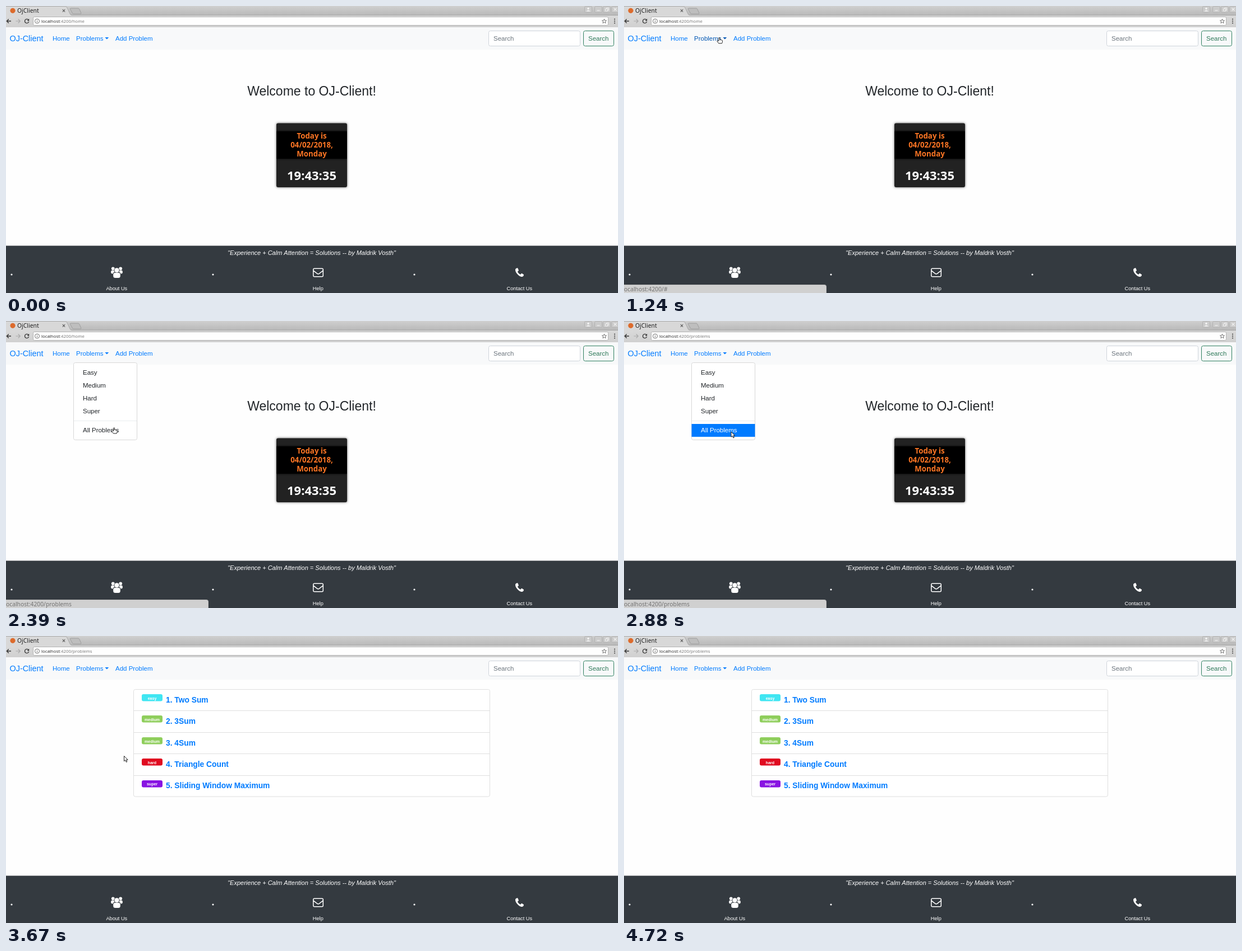
Animation, 1091 px wide and 513 px high, one loop 5290 ms. Source, as an HTML page with a canvas:

```html
<!DOCTYPE html>
<html lang="en">
<head>
<meta charset="utf-8">
<title>OjClient</title>
<style>
html, body { margin: 0; width: 100%; height: 100%; overflow: hidden; background: #fefefe; }
canvas { display: block; width: 1091px; height: 513px; }
</style>
</head>
<body>
<canvas id="stage" width="1091" height="513"></canvas>
<script>
const ctx = document.getElementById('stage').getContext('2d');
const LOOP = 5290;
const SANS = '"Liberation Sans", Arial, sans-serif';
const UI = '"Noto Sans", "Open Sans", sans-serif';
const BLUE = '#007bff', FOOTER = '#343a40';

function text(str, x, y, size, color, { family = SANS, style = '', align = 'left' } = {}) {
  ctx.font = `${style} ${size}px ${family}`;
  ctx.textAlign = align;
  ctx.fillStyle = color;
  ctx.fillText(str, x, y);
}

function rect(x, y, w, h, color) {
  ctx.fillStyle = color;
  ctx.fillRect(x, y, w, h);
}

function box(x, y, w, h, radius, fill, stroke) {
  ctx.beginPath();
  ctx.roundRect(x, y, w, h, radius);
  if (fill) { ctx.fillStyle = fill; ctx.fill(); }
  if (stroke) { ctx.strokeStyle = stroke; ctx.lineWidth = 1; ctx.stroke(); }
}

function shape(d, x, y, fill, stroke, width = 1) {
  const path = new Path2D(d);
  ctx.save();
  ctx.translate(x, y);
  ctx.lineJoin = 'round';
  if (fill) { ctx.fillStyle = fill; ctx.fill(path); }
  if (stroke) { ctx.strokeStyle = stroke; ctx.lineWidth = width; ctx.stroke(path); }
  ctx.restore();
}

function dot(x, y, r, color) {
  ctx.beginPath();
  ctx.arc(x, y, r, 0, Math.PI * 2);
  ctx.fillStyle = color;
  ctx.fill();
}

function vertical(y0, y1, top, bottom) {
  const g = ctx.createLinearGradient(0, y0, 0, y1);
  g.addColorStop(0, top);
  g.addColorStop(1, bottom);
  return g;
}

function drawBrowser(path) {
  rect(0, 0, 1091, 17, vertical(0, 17, '#cfcfcf', '#b8b8b8'));
  rect(0, 17, 1091, 21, vertical(17, 38, '#d9d9d9', '#d0d0d0'));
  shape('M0 17V1H106Q108 1 109 3L114 14Q115 17 118 17Z', 0, 0, '#d8d8d8');
  shape('M0 .5H106Q108 1 109 3L114 14Q115 16.5 118 16.5H1091', 0, 0, null, '#a0a0a0', .8);
  shape('M1 0H15Q16 0 17 2L20 9Q20 10 19 10H6Q5 10 4 8L0 1Z', 114, 4, '#bebebe', '#979797', .8);
  dot(12, 8.3, 4.6, '#dd6b2c');
  text('OjClient', 20, 12, 10.4, '#222', { family: UI });
  shape('M0 0L4.4 4.4M4.4 0L0 4.4', 100.8, 6.2, null, '#555', 1.1);

  [1031, 1049, 1064, 1079].forEach(x => box(x + .5, .5, 13, 11, 2, '#cbcbcb', '#b3b3b3'));
  dot(1038, 4.5, 1.8, '#f5f5f5');
  shape('M-3.5 4Q0 0 3.5 4Z', 1038, 5.5, '#f5f5f5');
  shape('M0 0H5', 1053.5, 8, null, '#f0f0f0', 1.3);
  shape('M0 1.5H4V5.5H0ZM2 1.5V0H6V4H4', 1068.5, 3.5, null, '#f0f0f0', 1);
  shape('M0 0L5 5M5 0L0 5', 1083.5, 3.5, null, '#f0f0f0', 1.2);

  const arrow = 'M8.5 4H1M4.3 .5L.8 4L4.3 7.5';
  shape(arrow, .5, 23, null, '#333', 1.3);
  ctx.save();
  ctx.scale(-1, 1);
  shape(arrow, -26, 23, null, '#aaa', 1.2);
  ctx.restore();
  shape('M3 -2.1A3.6 3.6 0 1 0 3.6 .8', 37, 27, null, '#333', 1.3);
  shape('M4.2 -4.2V-.6H.6Z', 37, 27, '#333');

  box(48.5, 19.5, 1025, 15, 2, '#fefefe', '#b2b2b2');
  shape('M4 0A4 4 0 1 1 -4 0A4 4 0 1 1 4 0M0 -.7V2.2M0 -2.3V-1.4', 55.5, 27, null, '#666', .9);
  const family = { family: UI };
  text('localhost', 63, 30, 7.8, '#333', family);
  const host = ctx.measureText('localhost').width;
  text(':4200/' + path, 63 + host, 30, 7.8, '#7c7c7c', family);
  shape('M0 -4L1.1 -1.3L4 -1.2L1.8 .6L2.6 3.5L0 1.9L-2.6 3.5L-1.8 .6L-4 -1.2L-1.1 -1.3Z', 1066.5, 27.2, null, '#555', .8);
  [23.5, 27, 30.5].forEach(y => dot(1085, y, 1.1, '#444'));
}

function drawNavbar(hover) {
  rect(0, 38, 1091, 40, '#f8f9fa');
  const color = hover ? '#0056b3' : BLUE;
  text('OJ-Client', 6.5, 63, 14.4, BLUE);
  text('Home', 83, 62, 11.5, BLUE);
  text('Problems', 125, 62, 11.5, color);
  shape('M0 0H6.8L3.4 3.5Z', 176.4, 56, color);
  text('Add Problem', 195, 62, 11.5, BLUE);
  box(860.5, 44.5, 163, 27, 3, '#fff', '#ced4da');
  text('Search', 869, 62, 11.5, '#6c757d');
  box(1029.5, 44.5, 54, 27, 3, null, '#2f8060');
  text('Search', 1038, 62, 11.5, '#2f7a5a');
}

function drawHome() {
  text('Welcome to OJ-Client!', 545, 160, 23, '#212529', { align: 'center' });
  ctx.save();
  ctx.shadowColor = 'rgba(0,0,0,.6)';
  ctx.shadowBlur = 4;
  box(482, 209.5, 126, 114.5, 3, '#222');
  ctx.beginPath();
  ctx.rect(482, 209, 126, 115);
  ctx.clip();
  ctx.shadowColor = '#000';
  rect(482, 224, 126, 49, '#000');
  ctx.restore();
  const bold = { family: UI, style: 'bold', align: 'center' };
  ['Today is', '04/02/2018,', 'Monday'].forEach((line, i) =>
    text(line, 545, 237 + 16 * i, 13.3, '#fb7524', bold));
  text('19:43:35', 545, 311, 22, '#fff', bold);
}

const LEVELS = { easy: '#40e6f2', medium: '#8fce5c', hard: '#e00b20', super: '#8813e2' };
const PROBLEMS = [
  ['easy', 'Two Sum'], ['medium', '3Sum'], ['medium', '4Sum'],
  ['hard', 'Triangle Count'], ['super', 'Sliding Window Maximum']
];

function drawProblems() {
  box(227.5, 95.5, 635, 191.5, 3, '#fff', '#dfdfdf');
  PROBLEMS.forEach(([level, name], i) => {
    const y = 95.5 + 38.4 * i;
    if (i) rect(228, Math.floor(y), 634, 1, '#dfdfdf');
    box(242, Math.round(y + 8.5), 37, 12.5, 3, LEVELS[level]);
    text(level, 260.5, Math.round(y + 18.3), 7.05, '#fff', { style: 'bold', align: 'center' });
    text(`${i + 1}. ${name}`, 285, Math.round(y + 23.3), 13.8, BLUE, { style: 'bold' });
  });
}

function drawMenu(pressed) {
  box(120.5, 74.5, 113, 138, 3, '#fff', '#d8d8d8');
  ['Easy', 'Medium', 'Hard', 'Super'].forEach((item, i) =>
    text(item, 137, 96 + 23 * i, 11.5, '#212529'));
  rect(121, 178, 112, 1, '#e9ecef');
  if (pressed) rect(120.5, 184, 113, 23, BLUE);
  text('All Problems', 137, 199, 11.5, pressed ? '#fff' : '#212529');
}

function drawFooter() {
  rect(0, 428.5, 1091, 85, FOOTER);
  text('"Experience + Calm Attention = Solutions -- by Maldrik Vosth"', 545, 445, 11, '#fff',
    { style: 'italic', align: 'center' });
  ['About Us', 'Help', 'Contact Us'].forEach((label, i) => {
    const x = 197.3 + 359 * i;
    dot(x - 187.3, 480, 1.6, '#fff');
    text(label, x, 508, 9.2, '#fff', { align: 'center' });
  });

  for (const side of [-1, 1]) {
    dot(197.5 + 6.7 * side, 469.3, 2.9, '#fff');
    box(197.5 + 6.7 * side - 3.6, 472.5, 7.2, 6, 2.2, '#fff');
  }
  dot(197.5, 472.5, 5, FOOTER);
  box(190.6, 475.5, 13.8, 11, 4, FOOTER);
  dot(197.5, 472.3, 4.1, '#fff');
  box(191.2, 476.7, 12.6, 9.3, 3.5, '#fff');

  shape('M2 0H15.5Q17.5 0 17.5 2V12.5Q17.5 14.5 15.5 14.5H2Q0 14.5 0 12.5V2Q0 0 2 0ZM0 3.5L7 9Q8.7 10.3 10.5 9L17.5 3.5',
    547.8, 469.3, null, '#fff', 1.5);
  shape('M0 3.2Q0 .8 3.6 0L4.3 .3L6 4.4L3.9 6.6Q5.5 10 9 11.6L11.2 9.5L15 11.6Q15 15.2 12 15.6Q8.5 16 4.3 11.7Q0 7.4 0 3.2Z',
    908, 468.3, '#fff');
}

function drawStatus(t) {
  let alpha = 0;
  if (t >= 1000 && t < 3260) alpha = Math.min(1, (t - 940) / 180);
  else if (t >= 3260 && t < 3430) alpha = .86 - .28 * Math.floor((t - 3260) / 56);
  if (alpha <= 0) return;
  ctx.save();
  ctx.globalAlpha = alpha;
  box(-3.5, 498.5, 364, 20, 3, '#d0d0d0', '#bcbcbc');
  text('localhost:4200/' + (t < 2290 ? '#' : 'problems'), -2.7, 510, 10.3, '#737373', { family: UI });
  ctx.restore();
}

// Pointer moves: start, end, step count, from, to, eased
const MOVES = [
  [230, 740, 9, 814, 418, 159, 51, true],
  [790, 1310, 7, 160, 49, 172, 58],
  [1380, 1380, 1, 172, 57, 172, 57],
  [1920, 2440, 8, 170, 67, 194, 198, true],
  [2490, 2490, 1, 193, 197, 193, 197],
  [2880, 2880, 1, 191, 198, 191, 198],
  [3600, 3670, 2, 199, 206, 210.5, 214.5],
  [3850, 4340, 9, 222, 217, 879, 390, true],
  [4410, 4660, 5, 897, 407, 1012, 503]
];

function pointerAt(t) {
  const move = MOVES.filter(m => m[0] <= t).pop();
  if (!move || t >= 4720) return null;
  const [start, end, steps, x0, y0, x1, y1, eased] = move;
  const gap = (end - start) / (steps - 1 || 1);
  const step = gap ? Math.min(steps - 1, Math.floor((t - start) / gap + .01)) : 0;
  let p = step / (steps - 1 || 1);
  if (eased) p = p * p * (3 - 2 * p);
  return { x: x0 + (x1 - x0) * p, y: y0 + (y1 - y0) * p };
}

function drawPointer(t) {
  const at = pointerAt(t);
  if (!at) return;
  const hand = t >= 735 && t < 2880;
  const outline = hand
    ? 'M-1 6V1Q-1 0 0 0Q1 0 1 1V4Q2 3.3 2.7 4.3Q3.7 3.7 4.2 4.6Q5.5 4.4 5.5 6V8L4.5 10.3H-1.2L-4 6.6Q-3.8 5 -2.3 5.5Z'
    : 'M0 0V9.3L2.2 7.4L3.9 11L5.4 10.3L3.8 6.8H6.7Z';
  shape(outline, at.x, at.y, '#fff', '#222', 1);
}

function draw(t) {
  const list = t >= 2940;
  rect(0, 0, 1091, 513, '#fefefe');
  drawBrowser(t >= 2880 ? 'problems' : 'home');
  drawNavbar(t >= 735 && t < 1990);
  if (list) drawProblems(); else drawHome();
  if (t >= 1640 && !list) drawMenu(t >= 2740);
  drawFooter();
  drawStatus(t);
  drawPointer(t);
}

const begin = performance.now();
function tick() {
  draw((performance.now() - begin) % LOOP);
  requestAnimationFrame(tick);
}
tick();
</script>
</body>
</html>
```
